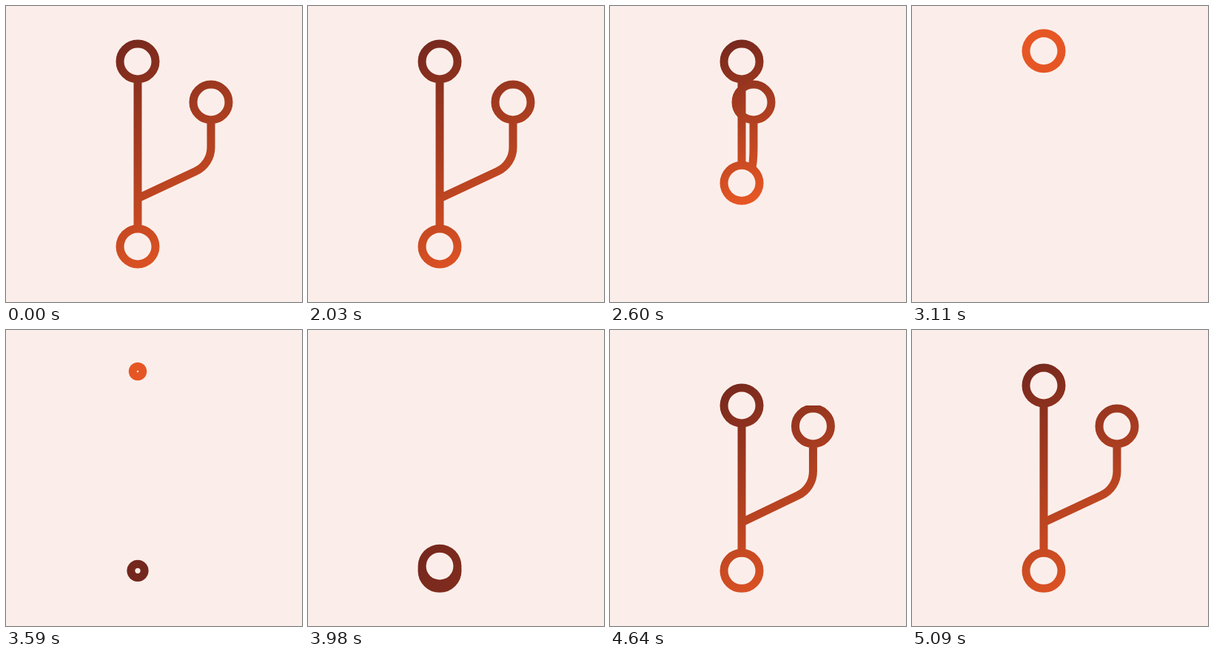
Recreate the animation shown at these times as an HTML page with a canvas. Size 400 by 400 pixels, loop 5.12 s.

```html
<!DOCTYPE html>
<html>
<head>
<meta charset="utf-8">
<style>
  html, body { margin: 0; height: 100%; overflow: hidden; background: #fbeeea; }
  canvas { display: block; }
</style>
</head>
<body>
<canvas id="stage" width="400" height="400"></canvas>
<script>
const ctx = document.getElementById('stage').getContext('2d');
const LOOP = 5120, BG = '#fbeeea';
const DARK = [116, 39, 29], ORANGE = [230, 86, 36];
const X = 178, SIDE_X = 277, TOP = 75, SIDE_Y = 130, BOTTOM = 325.3;
const OUTER = 29.5, STROKE = 11;

const clamp = v => Math.max(0, Math.min(1, v));
const lerp = (a, b, k) => a + (b - a) * k;
const mix = (a, b, k) => `rgb(${a.map((v, i) => Math.round(lerp(v, b[i], k)))})`;

// cubic-bezier(.76, 0, .24, 1), solved by bisection
function ease(x) {
  x = clamp(x);
  let lo = 0, hi = 1, s = x;
  for (let i = 0; i < 24; i++) {
    s = (lo + hi) / 2;
    const bx = 3 * (1 - s) ** 2 * s * .76 + 3 * (1 - s) * s * s * .24 + s ** 3;
    if (bx < x) lo = s; else hi = s;
  }
  return s * s * (3 - 2 * s);
}
const tween = (t, start, length, from, to) => lerp(from, to, ease((t - start) / length));

function circle(x, y, r) {
  ctx.moveTo(x + r, y);
  ctx.arc(x, y, r, 0, 7);
}

// Ring with a constant stroke that closes to a disc when small
function ring(y, outer) {
  if (outer <= 0) return;
  ctx.beginPath();
  circle(X, y, outer);
  ctx.fillStyle = ctx.strokeStyle;
  ctx.fill();
  if (outer <= STROKE) return;
  ctx.beginPath();
  circle(X, y, outer - STROKE);
  ctx.fillStyle = BG;
  ctx.fill();
}

function paint(topY, bottomY, sideX, leaving) {
  const k = clamp((bottomY - topY) / 60);
  const x0 = X - OUTER, y0 = Math.min(topY, bottomY) - OUTER;
  const w = Math.max(X, sideX) + OUTER - x0;
  const h = Math.max(topY, bottomY) + OUTER - y0;
  const g = ctx.createLinearGradient(x0, y0, x0 + w * .93, y0 + h * .93);
  g.addColorStop(0, leaving ? mix(ORANGE, DARK, k) : mix(DARK, DARK, 0));
  g.addColorStop(1, leaving ? mix(ORANGE, ORANGE, 0) : mix(DARK, ORANGE, k));
  ctx.strokeStyle = g;
}

// Everything but the moving ring, cut off at that ring's centre
function body(sideX, from, to, fixedY) {
  const bx = x => lerp(X, sideX, (x - X) / (SIDE_X - X));
  const r = OUTER - STROKE / 2;
  ctx.save();
  ctx.beginPath();
  ctx.rect(0, from, 400, to - from);
  ctx.clip();
  ctx.lineWidth = STROKE;
  ctx.beginPath();
  ctx.moveTo(X, TOP + r);
  ctx.lineTo(X, BOTTOM - r);
  ctx.moveTo(X, 260);
  ctx.lineTo(bx(256), 223.5);
  ctx.bezierCurveTo(bx(269), 217.5, sideX, 205, sideX, 191);
  ctx.lineTo(sideX, SIDE_Y + r);
  circle(sideX, SIDE_Y, r);
  circle(X, fixedY, r);
  ctx.stroke();
  ctx.restore();
}

function draw(t) {
  ctx.fillStyle = BG;
  ctx.fillRect(0, 0, 400, 400);

  // Fold up into the lower ring, which then shrinks away
  if (t < 4030) {
    const y = tween(t, 2015, 1300, 325, 56);
    const sideX = tween(t, 2022, 925, SIDE_X, X);
    paint(TOP, y, sideX, true);
    if (t < 3125) body(sideX, 0, y, TOP);
    ring(y, tween(t, 3122, 900, OUTER, 0));
  }

  // A new ring grows below and draws the figure on its way up
  if (t > 3140) {
    const y = tween(t, 3736, 1345, BOTTOM, TOP);
    const sideX = tween(t, 3888, 925, X, SIDE_X);
    paint(y, BOTTOM, sideX, false);
    if (t > 3736 && y < BOTTOM - .01) body(sideX, y, 400, BOTTOM);
    ring(y, tween(t, 3142, 900, 0, OUTER));
  }
}

function frame() {
  draw(performance.now() % LOOP);
  requestAnimationFrame(frame);
}
frame();
</script>
</body>
</html>
```
